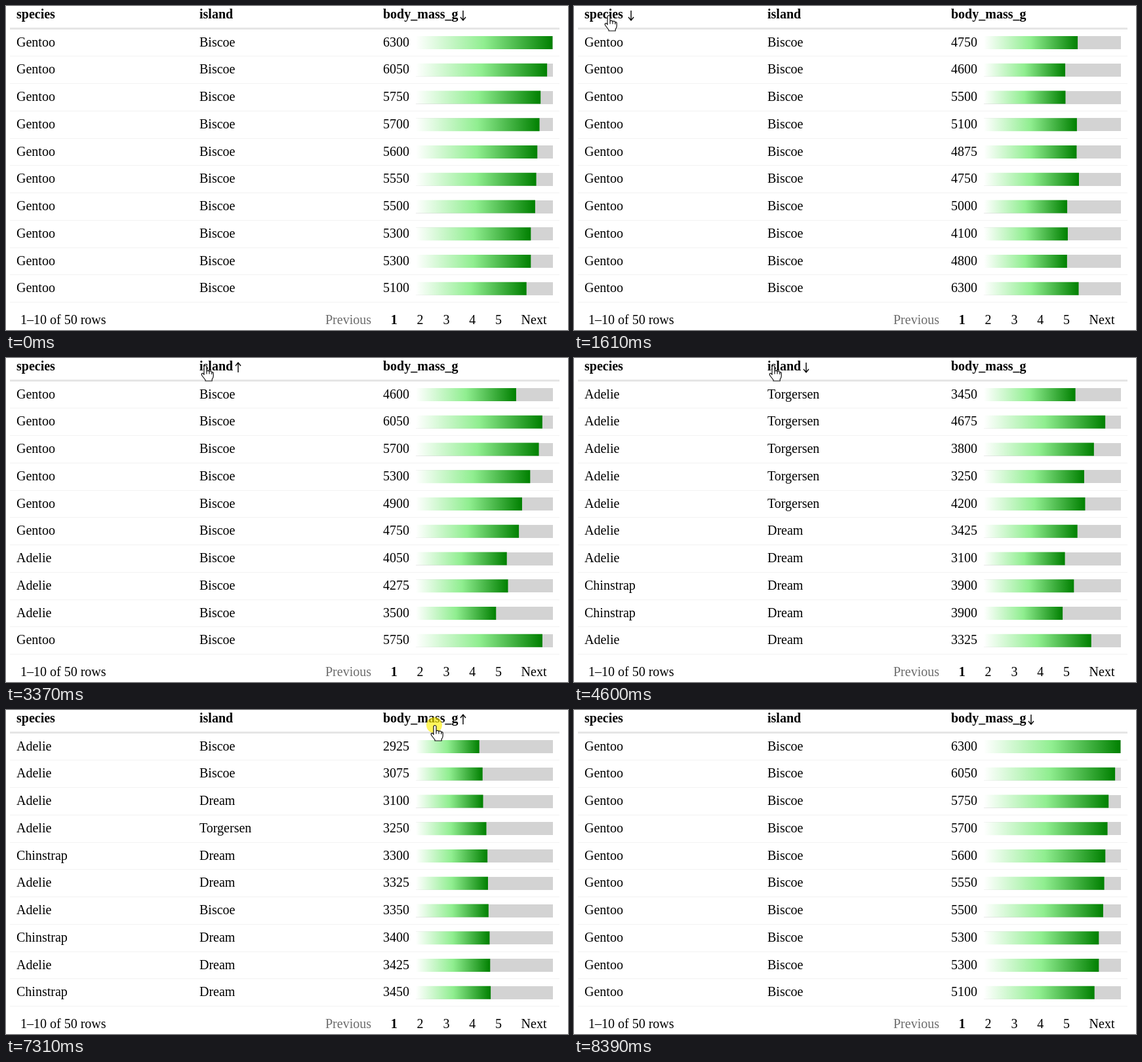
Animation, 857 px wide and 495 px high, one loop 8.54 s. Source, as an HTML page with a canvas:

```html
<!DOCTYPE html>
<html lang="en">
<head>
<meta charset="utf-8">
<title>Sortable table</title>
<style>
html, body { margin: 0; width: 100%; height: 100%; overflow: hidden; background: #fff; }
canvas { display: block; }
</style>
</head>
<body>
<canvas id="stage" width="857" height="495"></canvas>
<script>
const ctx = document.getElementById('stage').getContext('2d');
const LOOP = 8540, STEP = 77, TRANSITION = 1000;
const ROW_HEIGHT = 41.75, BAR_X = 625, TRACK_WIDTH = 209, BAR_WIDTH = 208.4, MAX_MASS = 6300;
const FONT = '20px "Liberation Serif", "Times New Roman", serif';
const NAMES = { A: 'Adelie', C: 'Chinstrap', G: 'Gentoo' };
const ISLANDS = { B: 'Biscoe', D: 'Dream', T: 'Torgersen' };
const COLUMNS = [
  { title: 'species', x: 16, arrowX: 87 },
  { title: 'island', x: 295, arrowX: 354 },
  { title: 'body_mass_g', x: 575, arrowX: 697 }
];

// Each row is written as species initial, island initial, mass.
function sorted(start, column, up, rows) {
  return { start, column, up, rows: rows.split(' ').map(r =>
    ({ species: NAMES[r[0]], island: ISLANDS[r[1]], mass: +r.slice(2) })) };
}
const sorts = [
  sorted(127, 0, true, 'AT4200 AD3500 AT3250 AB4050 AD4100 AB4275 AB3500 AT3800 AB3550 AD3800'),
  sorted(1440, 0, false, 'GB4750 GB4600 GB5500 GB5100 GB4875 GB4750 GB5000 GB4100 GB4800 GB6300'),
  sorted(2830, 1, true, 'GB4600 GB6050 GB5700 GB5300 GB4900 GB4750 AB4050 AB4275 AB3500 GB5750'),
  sorted(4398, 1, false, 'AT3450 AT4675 AT3800 AT3250 AT4200 AD3425 AD3100 CD3900 CD3900 AD3325'),
  sorted(5893, 2, true, 'AB2925 AB3075 AD3100 AT3250 CD3300 AD3325 AB3350 CD3400 AD3425 CD3450'),
  sorted(7370, 2, false, 'GB6300 GB6050 GB5750 GB5700 GB5600 GB5550 GB5500 GB5300 GB5300 GB5100')
];

// Pointer hot spot: tick, x, y
const pointerPath = [
  [0, 52, 14], [24, 52, 14], [25, 58, 14], [26, 84, 12], [27, 160, 12], [28, 220, 11],
  [29, 248, 11], [31, 285, 11], [34, 303, 11], [64, 303, 11], [65, 310, 11], [66, 334, 11],
  [67, 362, 11], [68, 463, 12], [69, 590, 17], [70, 635, 21], [72, 653, 23], [99, 653, 23],
  [101, 752, 188], [102, 782, 278], [103, 815, 393], [104, 833, 460], [105, 833, 460]
];
const hand = new Path2D('M-1 13.5V2.5a2 2 0 0 1 4 0V9.5q.3-1.4 2-1.2t2 1.5q.5-1 2-.7t1.8 1.6q2.3-.6 2.4 1.8V16.5q0 3-2 5V24H1V22.5L-4 16Q-5.5 13.5-4 12.5T-1 14.5ZM3 9.5v4M7 10v3.5M10.8 11v3');
const arrow = new Path2D('M0 0V16L3.8 12.5 6.4 18.5 8.8 17.4 6.2 11.6H11.5Z');

// CSS "ease": cubic-bezier(.25, .1, .25, 1)
function ease(x) {
  if (x <= 0) return 0;
  if (x >= 1) return 1;
  const bezier = (s, a, b) => 3 * (1 - s) ** 2 * s * a + 3 * (1 - s) * s * s * b + s ** 3;
  let low = 0, high = 1;
  for (let i = 0; i < 20; i++) {
    const mid = (low + high) / 2;
    if (bezier(mid, .25, .25) < x) low = mid; else high = mid;
  }
  return bezier(low, .1, 1);
}

function text(str, x, y, { bold = false, color = '#000', align = 'left' } = {}) {
  ctx.font = (bold ? 'bold ' : '') + FONT;
  ctx.fillStyle = color;
  ctx.textAlign = align;
  ctx.fillText(str, x, y);
}

function rect(x, y, w, h, fill) {
  ctx.fillStyle = fill;
  ctx.fillRect(x, y, w, h);
}

function drawHeader({ column, up }) {
  for (const { title, x } of COLUMNS) text(title, x, 19, { bold: true });
  rect(6, 33, 838, 3, '#e5e5e5');
  const x = COLUMNS[column].arrowX, tip = up ? 7 : 22, dir = up ? 1 : -1;
  ctx.beginPath();
  ctx.moveTo(x, tip + 15 * dir);
  ctx.lineTo(x, tip);
  ctx.moveTo(x - 4, tip + 5 * dir);
  ctx.lineTo(x, tip);
  ctx.lineTo(x + 4, tip + 5 * dir);
  ctx.strokeStyle = '#000';
  ctx.lineWidth = 1.4;
  ctx.stroke();
}

function drawRow(row, i, shownMass) {
  const top = i * ROW_HEIGHT;
  const baseline = 62 + Math.floor(top);
  text(row.species, 16, baseline);
  text(row.island, 295, baseline);
  text(row.mass, 575, baseline);
  rect(6, Math.round(76.3 + top), 838, 1, '#f2f2f2');

  const width = shownMass / MAX_MASS * BAR_WIDTH;
  const fill = ctx.createLinearGradient(BAR_X, 0, BAR_X + width, 0);
  fill.addColorStop(0, 'white');
  fill.addColorStop(.5, 'lightgreen');
  fill.addColorStop(1, 'green');
  rect(BAR_X, Math.round(46 + top), TRACK_WIDTH, 20, 'lightgray');
  rect(BAR_X, 46 + top, width, 20, fill);
}

function drawFooter() {
  text('1–10 of 50 rows', 22, 486);
  text('Previous', 487, 486, { color: '#6c6c6c' });
  for (let page = 1; page <= 5; page++) {
    text(page, 552 + 39.8 * page, 486, { bold: page === 1, align: 'center' });
  }
  text('Next', 805, 486, { align: 'center' });
}

function drawPointer(tick, clicking) {
  const next = pointerPath.findIndex(p => p[0] > tick);
  if (next < 1) return;
  const [t0, x0, y0] = pointerPath[next - 1], [t1, x1, y1] = pointerPath[next];
  const part = (tick - t0) / (t1 - t0);
  const x = x0 + (x1 - x0) * part, y = y0 + (y1 - y0) * part;
  ctx.save();
  ctx.translate(x, y);
  if (clicking) {
    ctx.beginPath();
    ctx.arc(0, 0, 12, 0, 2 * Math.PI);
    ctx.fillStyle = 'rgba(255, 240, 0, .64)';
    ctx.fill();
  }
  const shape = y > 36 ? arrow : hand;
  ctx.fillStyle = '#fff';
  ctx.strokeStyle = '#111';
  ctx.lineWidth = 1.2;
  ctx.lineJoin = 'round';
  ctx.fill(shape);
  ctx.stroke(shape);
  ctx.restore();
}

function draw(now) {
  const tick = Math.floor((now % LOOP - 51) / STEP);
  const time = 70 + tick * STEP;
  const done = sorts.filter(s => time + 20 >= s.start).length;
  const last = sorts.length - 1;
  const current = sorts[done ? done - 1 : last];
  const previous = sorts[done > 1 ? done - 2 : last];
  const progress = done ? ease((time - current.start) / TRANSITION) : 1;
  const clicking = done <= last && time > sorts[done].start - 130;

  rect(0, 0, 857, 495, '#fff');
  drawHeader(current);
  current.rows.forEach((row, i) => {
    const from = previous.rows[i].mass;
    drawRow(row, i, from + (row.mass - from) * progress);
  });
  drawFooter();
  drawPointer(tick, clicking);
}

const origin = performance.now();
function loop() {
  draw(performance.now() - origin);
  requestAnimationFrame(loop);
}
loop();
</script>
</body>
</html>
```
